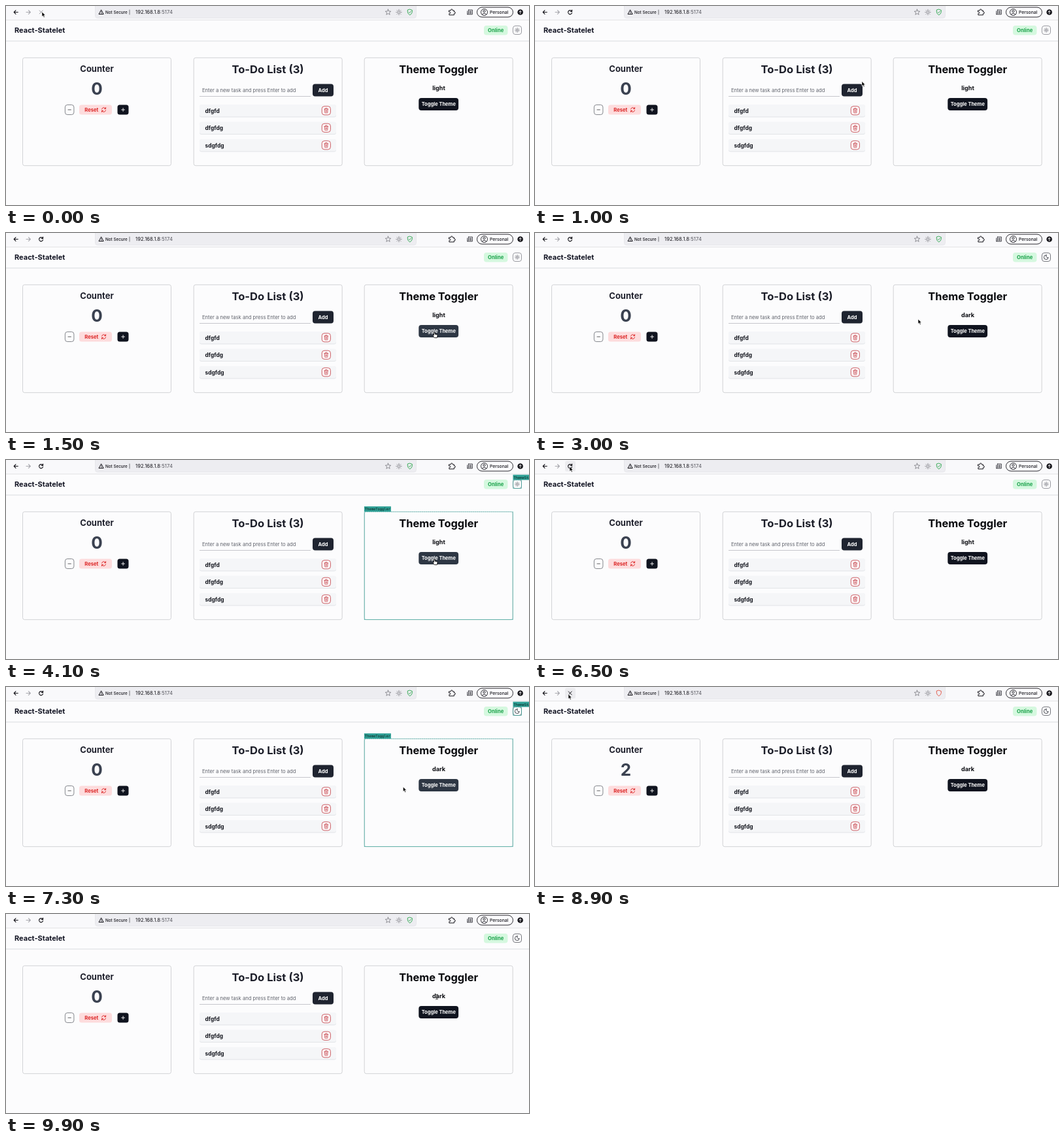
An HTML page that plays this animation: 800x305 px, repeating every 10 s.

```html
<!DOCTYPE html>
<html lang="en">
<head>
<meta charset="utf-8">
<title>React-Statelet</title>
<style>
  html, body { margin: 0; width: 100%; height: 100%; overflow: hidden; background: #fcfcfd; }
  svg { display: block; width: 100vw; height: 100vh; font-family: Inter, "Open Sans", sans-serif; }
  .line { fill: none; stroke-linecap: round; stroke-linejoin: round; }
  .mono { font-family: "DejaVu Sans Mono", "Liberation Mono", monospace; }
</style>
</head>
<body>
<svg id="stage" viewBox="0 0 800 305"></svg>
<script>
const stage = document.getElementById('stage');
const DARK = '#10141f', HOVER = '#2e3744', RED = '#dc2626', TRASH = '#c23a42', TEAL = '#2fa096', INK = '#20222e';

function add(tag, attrs, parent = stage) {
  const el = document.createElementNS('http://www.w3.org/2000/svg', tag);
  for (const key in attrs) el.setAttribute(key, attrs[key]);
  parent.appendChild(el);
  return el;
}
const group = (parent = stage) => add('g', {}, parent);
const rect = (x, y, width, height, rx, fill, parent, more = {}) =>
  add('rect', { x, y, width, height, rx, fill, ...more }, parent);
const line = (d, stroke, width = 1, parent, more = {}) =>
  add('path', { d, class: 'line', stroke, 'stroke-width': width, ...more }, parent);
function text(str, x, y, size, weight, fill, anchor = 'start', parent, more = {}) {
  const el = add('text', {
    x, y, fill, 'font-size': size, 'font-weight': weight, 'text-anchor': anchor, ...more
  }, parent);
  el.textContent = str;
  return el;
}
const show = (el, on) => el.setAttribute('visibility', on ? 'visible' : 'hidden');

function rays(cx, cy, inner, outer) {
  let d = '';
  for (let i = 0; i < 8; i++) {
    const c = Math.cos(i * Math.PI / 4), s = Math.sin(i * Math.PI / 4);
    d += `M${cx + c * inner} ${cy + s * inner}L${cx + c * outer} ${cy + s * outer}`;
  }
  return d;
}
function sun(cx, cy, radius, inner, outer, color, parent) {
  const g = group(parent);
  add('circle', { cx, cy, r: radius, fill: 'none', stroke: color, 'stroke-width': .8 }, g);
  line(rays(cx, cy, inner, outer), color, .8, g);
  return g;
}

// Browser toolbar
rect(0, 0, 800, 305, 0, '#fcfcfd');
rect(0, 0, 800, 21, 0, '#f9f9fb');
rect(0, 21, 800, .8, 0, '#dedee2');
const reloadBg = rect(46, 1.5, 16, 16, 2.5, '#ececef');
line('M18.3 9.5H12.3M15 6.7L12.2 9.5L15 12.3', '#15141a', 1.1);
line('M31 9.5H37M34.5 6.7L37.3 9.5L34.5 12.3', '#a5a5ab', 1.1);
const reloadIcon = line('M56.2 8.1A3 3 0 1 0 56.5 10.4M56.6 6.1V8.5H54.2', '#15141a', 1.1);
const stopIcon = line('M51.2 6.9L56.2 11.9M56.2 6.9L51.2 11.9', '#15141a', 1);

rect(136.5, -4, 491, 22.5, 3.5, '#ededf1', stage, { stroke: '#dfdfe4', 'stroke-width': .6 });
line('M145.8 6.2L149.2 12.5H142.4Z', '#15141a', 1);
line('M145.8 8.6V10.2M145.8 11.3V11.4', '#15141a', .8);
text('Not Secure', 152, 11.8, 6.3, 500, '#15141a');
line('M189 6V13', '#55555c', .8);
const url = text('192.168.1.8', 198, 12.1, 7.7, 400, '#15141a');
add('tspan', { fill: '#55555d' }, url).textContent = ':5174';

let star = 'M';
for (let i = 0; i < 10; i++) {
  const r = i % 2 ? 2 : 4.5, a = (i / 5 - .5) * Math.PI;
  star += `${i ? 'L' : ''}${584.5 + r * Math.cos(a)} ${9.6 + r * Math.sin(a)}`;
}
line(star + 'Z', '#77777d', .8);
sun(601, 9.5, 1.8, 3, 4.2, '#77777d');
const shield = line('M617.8 5.2L621.3 6.4V9.2Q621 12 617.8 13.8Q614.6 12 614.3 9.2V6.4Z', '#27a54a', .9);
const shieldTick = line('M616.2 9.4L617.4 10.6L619.7 8', '#27a54a', .9);

line('M677.9 6.9H680.5V6.2A1.3 1.3 0 0 1 683.1 6.2V6.9H685.4V9.1H686.2A1.2 1.2 0 0 1 686.2 11.6H685.4V13.8H677.9V11.5H678.7A1.2 1.2 0 0 0 678.7 9.1H677.9Z', '#15141a', 1);
line('M707.4 6H713.4V12.8H705.8V8M707.4 6V11.5Q707.2 12.8 705.8 12.8M709 8H711.8M709 9.6H711.8M709 11.2H711.8', '#33333a', .9);
rect(720.5, 2, 55, 15, 7.5, '#fbfbfd', stage, { stroke: '#15141a', 'stroke-width': .9 });
add('circle', { cx: 731.5, cy: 9.5, r: 5, fill: 'none', stroke: '#15141a', 'stroke-width': .9 });
add('circle', { cx: 731.5, cy: 8, r: 1.6, fill: 'none', stroke: '#15141a', 'stroke-width': .9 });
line('M728.4 13Q731.5 9.4 734.6 13', '#15141a', .9);
text('Personal', 740, 11.9, 6.8, 500, '#15141a');
add('circle', { cx: 786.7, cy: 9.5, r: 4.3, fill: '#15141a' });
line('M786.7 11.8V7.4M784.9 9.1L786.7 7.3L788.5 9.1', '#fff', .9);

// Page header
rect(0, 53, 800, 1, 0, '#e3e4e7');
rect(0, 54, 800, 1, 0, '#f3f3f5');
text('React-Statelet', 13, 41.3, 11, 700, '#111322');
rect(731, 30, 36.5, 14.5, 4, '#d5f8df');
text('Online', 749.2, 40, 7.7, 700, '#1ba24b', 'middle');
const themeBox = rect(775.5, 30.5, 13, 13, 3.5, '#fdfdfe', stage, { 'stroke-width': .8 });
const sunIcon = sun(782, 37, 1.4, 2.5, 3.6, '#6b6d75');
const moonIcon = line('M782.2 33.8A2.5 2.5 0 0 0 785.2 37.5A3.4 3.4 0 1 1 782.2 33.8Z', '#33353d', .9);

// Cards
for (const x of [25.5, 287.2, 548.2])
  rect(x, 79.3, 227, 165.4, 3, '#fcfcfd', stage, { stroke: '#cdced2', 'stroke-width': .9 });

text('Counter', 139, 101.3, 13, 700, INK, 'middle');
const counter = text('0', 139, 136, 26, 700, '#3a4150', 'middle');
rect(90.4, 151.5, 13.5, 15, 3.5, '#fdfdfe', stage, { stroke: '#686a72', 'stroke-width': .8 });
line('M95 159H99.4', '#333', .8);
rect(112, 151.5, 50, 15, 3.5, '#fddcdd');
text('Reset', 120.3, 161.7, 7.6, 700, RED);
line('M146.6 158.2A3 3 0 0 1 152.3 157.4M152.6 155.5V157.6H150.5M152.5 159.8A3 3 0 0 1 146.8 160.6M146.5 162.5V160.4H148.6', RED, .9);
const plusButton = rect(170.5, 151.5, 17, 15, 3.5, DARK);
line('M176.7 159H181.5M179.1 156.6V161.4', '#fff', .9);

text('To-Do List (3)', 400.5, 103.3, 16.6, 700, '#1c1e29', 'middle');
text('Enter a new task and press Enter to add', 300, 131.5, 7.65, 400, '#62656e');
rect(296, 138.2, 170, .8, 0, '#b9bbc1');
rect(469, 119.5, 32, 19, 4, '#1f2430');
text('Add', 485, 131.7, 7.6, 700, '#fff', 'middle');
['dfgfd', 'dfgfdg', 'sdgfdg'].forEach((task, i) => {
  const y = 151 + i * 26.5;
  rect(296, y + .8, 209, 18.8, 3, '#e2e4e8');
  rect(296, y, 209, 18.6, 3, '#f5f6f8');
  text(task, 304.5, y + 12.6, 8.4, 700, '#15171f');
  rect(483.2, y + 2.7, 13.2, 13.2, 3.8, '#fdf8f9', stage, { stroke: TRASH, 'stroke-width': .8 });
  line(`M486.8 ${y + 7}H492.8M488.6 ${y + 6.8}V${y + 5.6}H491V${y + 6.8}M487.4 ${y + 7}L487.8 ${y + 12.8}H491.8L492.2 ${y + 7}M489 ${y + 8.6}V${y + 11.2}M490.6 ${y + 8.6}V${y + 11.2}`, TRASH, .7);
});

text('Theme Toggler', 661.7, 103.3, 16.4, 700, '#08090d', 'middle');
const themeName = text('light', 662, 129.3, 9.1, 700, '#0c0d12', 'middle');
const themeButton = rect(631.3, 141, 60.8, 19, 4, DARK);
text('Toggle Theme', 661.8, 153.4, 7.5, 700, '#fff', 'middle');

// Render highlights
function highlight(x, y, width, height, label, labelWidth, color, border) {
  const g = group();
  rect(x, y, width, height, 0, 'none', g, { stroke: border, 'stroke-width': .7 });
  line(`M${x} ${y}H${x + width}`, '#fcfcfd', .6, g, { 'stroke-dasharray': '1 2' });
  const tag = rect(x - .3, y - 8.2, labelWidth, 8, 0, color, g);
  const name = text(label, x + .8, y - 2.2, 5.4, 400, '#0b2420', 'start', g, { class: 'mono' });
  return { g, tag, name };
}
const counterMark = highlight(25.5, 79.3, 227, 165.4, 'SampleCounter', 53, '#539f74', '#7aa99f');
const themeMark = highlight(548.2, 79.3, 227, 165.4, 'ThemeToggler', 41, TEAL, TEAL);
const statusMark = highlight(775.8, 30.8, 12.6, 12.6, 'ThemeStatus', 37, TEAL, TEAL);

// Pointers, each with its hot spot at 0,0
const outline = { stroke: '#fff', 'stroke-width': .6, fill: '#000', 'stroke-linejoin': 'round' };
const pointers = {
  arrow: add('path', { d: 'M0 0V7.3L1.7 5.8L2.9 8.5L4.2 7.9L3 5.3H5.2Z', ...outline }),
  hand: add('path', {
    d: 'M-.6 .4Q.2 -.5 1 .4V3L4.2 3.7Q5.2 4 5 5.2L4.4 8.6H.4L-2 5.4Q-1.8 4.2-.6 5Z',
    fill: '#fff', stroke: '#000', 'stroke-width': .8, 'stroke-linejoin': 'round'
  }),
  beam: line('M-1.5 -4Q0 -4 0 -3V3Q0 4 -1.5 4M1.5 -4Q0 -4 0 -3M0 3Q0 4 1.5 4M-1 1H1', '#222', .8)
};

// Timeline: pointer stops as [ms, x, y]
const stops = [
  [0, 55, 9], [400, 57, 11], [1300, 655, 152], [2300, 655, 152], [2700, 600, 138],
  [3000, 586, 132], [3400, 53, 10], [3500, 53, 10], [3800, 655, 152], [4200, 655, 152],
  [4800, 184, 165.5], [5500, 184, 165.5], [6000, 53, 10], [6500, 53, 10], [7000, 655, 152],
  [7200, 650, 152], [7300, 607.4, 153], [8000, 180, 159], [8300, 180, 159],
  [8800, 51, 11], [9200, 51, 11], [9800, 659, 127], [10000, 659, 127]
];
const toggles = [1700, 3900, 7200];
const clicks = [4900, 5100, 5200, 8100, 8300];
const loads = [[0, 300], [3400, 3700], [6200, 6500], [8900, 9200]];
const MARK_MS = 400;

function pointerAt(t) {
  const i = Math.max(1, stops.findIndex(s => s[0] >= t));
  const [t0, x0, y0] = stops[i - 1], [t1, x1, y1] = stops[i];
  const p = (t - t0) / (t1 - t0), k = p * p * (3 - 2 * p);
  return { x: x0 + (x1 - x0) * k, y: y0 + (y1 - y0) * k };
}
const inside = (p, x, y, w, h) => p.x >= x && p.x <= x + w && p.y >= y && p.y <= y + h;
const onTheme = p => inside(p, 631, 141, 61, 19);
const onPlus = p => inside(p, 170, 151, 17.5, 15.5);
const onButton = p => onTheme(p) || onPlus(p) || inside(p, 112, 151, 50, 15) ||
  inside(p, 469, 119, 32, 19) || inside(p, 90, 151, 14, 15);

function render(t) {
  const now = pointerAt(t), before = pointerAt(Math.max(0, t - 100));
  const dark = toggles.filter(c => c <= t).length % 2 === 1;
  const lastLoad = Math.max(...loads.map(l => l[1]).filter(end => end <= t), 0);
  const done = clicks.filter(c => c <= t && c > lastLoad);
  const recent = list => list.some(c => t >= c && t < c + MARK_MS);
  const loading = loads.some(([a, b]) => t >= a && t < b);

  counter.textContent = done.length;
  themeName.textContent = dark ? 'dark' : 'light';
  show(sunIcon, !dark);
  show(moonIcon, dark);
  themeBox.setAttribute('stroke', dark ? '#55575f' : '#80828a');
  themeButton.setAttribute('fill', onTheme(now) || onTheme(before) ? HOVER : DARK);
  plusButton.setAttribute('fill', onPlus(now) || onPlus(before) ? HOVER : DARK);

  show(reloadIcon, !loading);
  show(stopIcon, loading);
  stopIcon.setAttribute('stroke', t < 300 ? '#9a9aa0' : '#15141a');
  show(reloadBg, t >= 300 && inside(now, 46, 1, 16, 17));
  const blocked = t >= 8900 && t < 9100;
  shield.setAttribute('stroke', blocked ? '#e2503f' : '#27a54a');
  show(shieldTick, !blocked);

  show(counterMark.g, recent(done));
  counterMark.name.textContent = 'SampleCounter' + (done.length > 1 ? ' x' + done.length : '');
  counterMark.tag.setAttribute('width', done.length > 1 ? 53 : 43);
  show(themeMark.g, recent(toggles));
  show(statusMark.g, recent(toggles));

  const kind = onButton(now) ? 'hand' : inside(now, 652, 121, 20, 10) ? 'beam' : 'arrow';
  for (const name in pointers) {
    show(pointers[name], name === kind);
    pointers[name].setAttribute('transform', `translate(${now.x} ${now.y})`);
  }
}

// The picture advances ten times a second
function tick() {
  render(Math.floor(performance.now() % 10000 / 100) * 100);
  requestAnimationFrame(tick);
}
tick();
</script>
</body>
</html>
```
